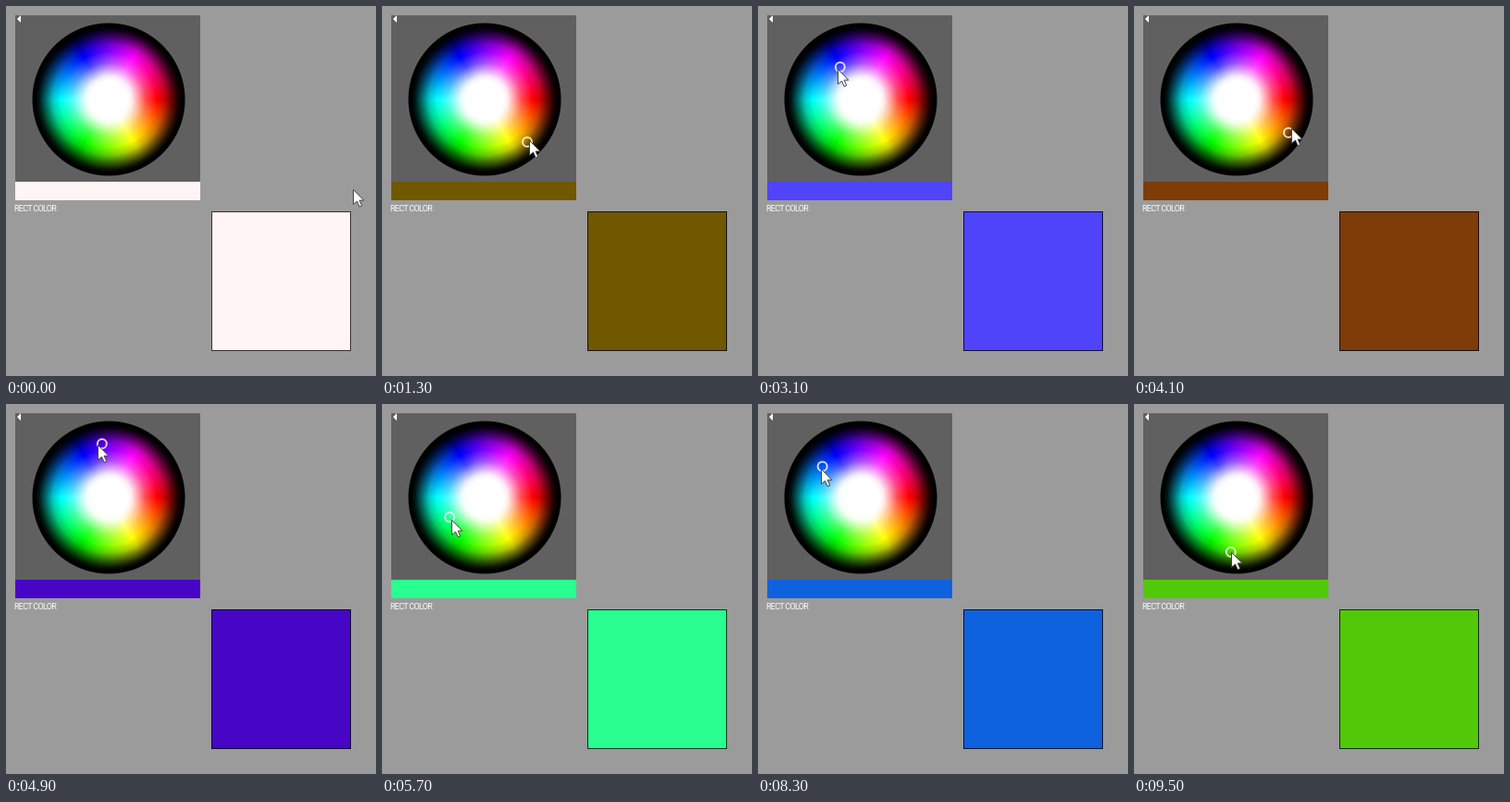
Recreate the animation shown at these times as an HTML page with a canvas. Size 400 by 400 pixels, loop 9.6 s.

```html
<!DOCTYPE html>
<html lang="en">
<head>
<meta charset="utf-8">
<title>Color wheel</title>
<style>
html, body { margin: 0; width: 100%; height: 100%; overflow: hidden; background: #9b9b9b; }
canvas { position: absolute; left: 0; top: 0; }
#label {
  position: absolute; left: 9px; top: 214px;
  font: 9px/10px Roboto, sans-serif; letter-spacing: -0.7px;
  color: #fff; white-space: nowrap;
}
</style>
</head>
<body>
<canvas id="stage" width="400" height="400"></canvas>
<div id="label">RECT COLOR</div>
<script>
const LOOP = 9600, STEP = 100, PRESS = 800, LEAD = 30;
const CX = 110, CY = 100;
const IDLE = 'rgb(255,245,245)';
const ctx = document.getElementById('stage').getContext('2d');

// time, angle, radius, hue, saturation, lightness
const KEYS = [
  [PRESS, 66, 58, 66, 100, 36],
  [1300, 45, 66.5, 47, 100, 22],
  [3100, -122, 40, -116, 93, 62],
  [4100, -327, 68, -333, 88, 26],
  [5700, -571, 43, -571, 100, 58],
  [7000, -724, 44, -731, 86, 52],
  [9500, -985, 60.2, -983, 92, 41]
];

// radius, lightness
const SHADE = [[0, 1], [20, 1], [25, 0.96], [40, 0.64], [60, 0.4], [67, 0.23], [75, 0.05], [79, 0], [99, 0]];

const clamp = (v, lo, hi) => Math.min(hi, Math.max(lo, v));

function slope(i, c) {
  const a = KEYS[Math.max(0, i - 1)], b = KEYS[Math.min(KEYS.length - 1, i + 1)];
  return (b[c] - a[c]) / (b[0] - a[0]);
}

// Cubic Hermite through the keys
function track(t, c) {
  t = clamp(t, PRESS, KEYS[KEYS.length - 1][0]);
  let i = 0;
  while (i < KEYS.length - 2 && t >= KEYS[i + 1][0]) i++;
  const a = KEYS[i], b = KEYS[i + 1], d = b[0] - a[0];
  const u = (t - a[0]) / d, u2 = u * u, u3 = u2 * u;
  return (2 * u3 - 3 * u2 + 1) * a[c] + (u3 - 2 * u2 + u) * d * slope(i, c)
    + (3 * u2 - 2 * u3) * b[c] + (u3 - u2) * d * slope(i + 1, c);
}

function wheelPoint(t) {
  const a = track(t, 1) * Math.PI / 180, r = track(t, 2);
  return [CX + r * Math.cos(a), CY + r * Math.sin(a)];
}

function pointer(t) {
  if (t >= PRESS) return wheelPoint(t + LEAD);
  const u = t / PRESS, e = u * u * (3 - 2 * u), [x, y] = wheelPoint(PRESS + LEAD);
  return [375 + (x - 375) * e, 198 + (y - 198) * e];
}

function pickedColor(t) {
  if (t < PRESS) return IDLE;
  return `hsl(${track(t, 3)},${clamp(track(t, 4), 0, 100)}%,${clamp(track(t, 5), 0, 100)}%)`;
}

function shade(r) {
  const i = SHADE.findIndex(s => s[0] > r), [r0, l0] = SHADE[i - 1], [r1, l1] = SHADE[i];
  return l0 + (l1 - l0) * (r - r0) / (r1 - r0);
}

function makeWheel() {
  const size = 166, c = document.createElement('canvas');
  c.width = c.height = size;
  const g = c.getContext('2d'), img = g.createImageData(size, size);
  for (let y = 0, p = 0; y < size; y++) {
    for (let x = 0; x < size; x++, p += 4) {
      const dx = x - 82.5, dy = y - 82.5, r = Math.hypot(dx, dy);
      if (r > 84) continue;
      const h = (Math.atan2(dy, dx) * 6 / Math.PI + 12) % 12;
      const l = shade(r), a = Math.min(l, 1 - l);
      [0, 8, 4].forEach((n, k) => {
        const q = (n + h) % 12;
        img.data[p + k] = 255 * (l - a * clamp(Math.min(q - 3, 9 - q), -1, 1));
      });
      img.data[p + 3] = 255 * clamp(83 - r, 0, 1);
    }
  }
  g.putImageData(img, 0, 0);
  return c;
}

const wheel = makeWheel();
const arrow = new Path2D('M0 0V16L4 12.6L6.7 18.6L9.2 17.5L6.6 11.6H11.3Z');

function box(x, y, w, h, color) {
  ctx.fillStyle = color;
  ctx.fillRect(x, y, w, h);
}

function draw(t) {
  const color = pickedColor(t);
  box(0, 0, 400, 400, '#9b9b9b');
  box(10, 10, 200, 180, '#606060');
  box(10, 190, 200, 20, color);
  ctx.drawImage(wheel, 28, 18);

  ctx.fillStyle = '#fff';
  ctx.fill(new Path2D('M12 14L16 10V18Z'));

  box(222, 222, 151, 151, color);
  ctx.lineWidth = 1;
  ctx.strokeStyle = 'rgba(0,0,0,.8)';
  ctx.strokeRect(222.5, 222.5, 150, 150);

  const [mx, my] = t < PRESS ? [CX, CY] : wheelPoint(t);
  ctx.beginPath();
  ctx.arc(mx, my, 5, 0, 2 * Math.PI);
  ctx.lineWidth = 2;
  ctx.strokeStyle = 'rgba(255,255,255,.8)';
  ctx.stroke();

  const [px, py] = pointer(t);
  ctx.save();
  ctx.translate(Math.round(px) + 0.5, Math.round(py) + 0.5);
  ctx.fillStyle = '#fff';
  ctx.fill(arrow);
  ctx.lineWidth = 1;
  ctx.strokeStyle = '#444';
  ctx.stroke(arrow);
  ctx.restore();
}

const start = performance.now();
function tick() {
  const t = (performance.now() - start) % LOOP;
  draw(Math.floor(t / STEP) * STEP);
  requestAnimationFrame(tick);
}
tick();
</script>
</body>
</html>
```
